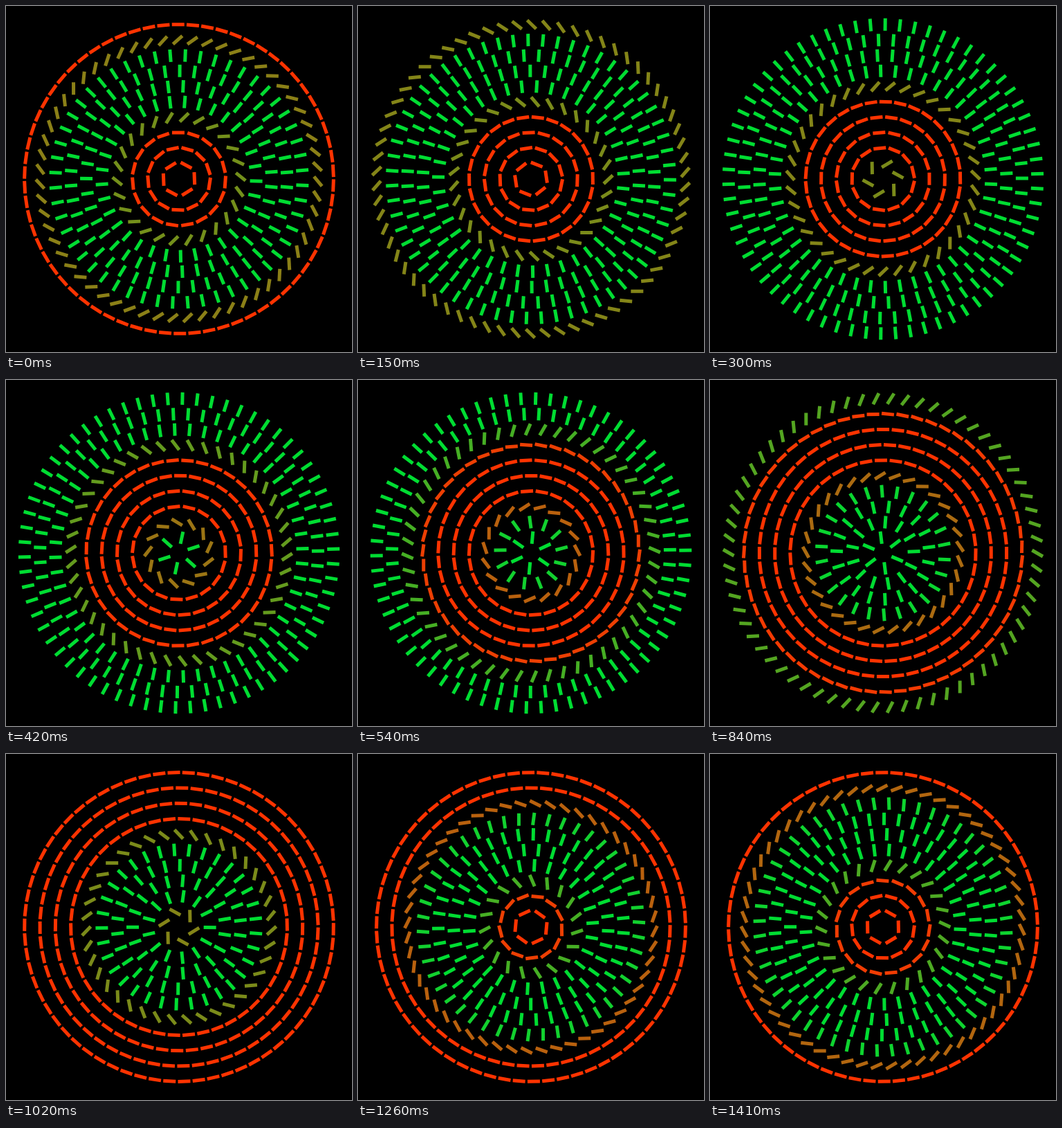
An HTML page with a canvas for the animation above (1.44 s loop, 500 by 500 pixels).

```html
<!DOCTYPE html>
<html>
<head>
<meta charset="utf-8">
<style>
  html, body { margin: 0; height: 100%; overflow: hidden; background: #000; }
  canvas { display: block; }
</style>
</head>
<body>
<canvas id="stage" width="500" height="500"></canvas>
<script>
const ctx = document.getElementById('stage').getContext('2d');
const LOOP = 1440, RING_DELAY = 144, TURN = 300, FIRST_TURN = -566;
const RING_GAP = 22.32, LENGTH = 18, WIDTH = 5;
const GREEN = [0, 221, 50], RED = [255, 51, 0];

// Starting angle of each ring, in degrees clockwise from the top
const START = [27.8, -11.9, -0.9, 4.85, 4.25, 2.56, 0.4, 2.9, -0.55, -0.33];

const ease = x => (1 - Math.cos(Math.PI * Math.min(1, Math.max(0, x)))) / 2;

// Quarter turns made so far: even values are radial, odd values tangential
function quarterTurns(ring, time) {
  const half = LOOP / 2;
  const sinceTurn = time - FIRST_TURN - ring * RING_DELAY + half / 2 + 2 * LOOP;
  const count = Math.floor(sinceTurn / half);
  const local = sinceTurn - count * half - half / 2;
  return count + ease(local / TURN + 0.5);
}

function mixColor(amount) {
  return `rgb(${GREEN.map((g, i) => Math.round(g + (RED[i] - g) * amount))})`;
}

function drawRing(ring, time) {
  const count = Math.floor(6.6 * ring + 1e-6);
  const direction = ring % 2 ? -1 : 1;
  const step = 2 * Math.PI / count;
  const start = START[ring - 1] * Math.PI / 180 + direction * step * time / LOOP;
  const turns = quarterTurns(ring, time);
  ctx.fillStyle = mixColor(1 - Math.abs(1 - turns % 2));
  for (let i = 0; i < count; i++) {
    ctx.save();
    ctx.translate(250, 250);
    ctx.rotate(start + i * step);
    ctx.translate(0, -ring * RING_GAP);
    ctx.rotate(direction * turns * Math.PI / 2);
    ctx.fillRect(-WIDTH / 2, -LENGTH / 2, WIDTH, LENGTH);
    ctx.restore();
  }
}

function draw(now) {
  const time = now % LOOP;
  ctx.fillStyle = '#000';
  ctx.fillRect(0, 0, 500, 500);
  for (let ring = 1; ring <= 10; ring++) drawRing(ring, time);
  requestAnimationFrame(draw);
}

draw(performance.now());
</script>
</body>
</html>
```
